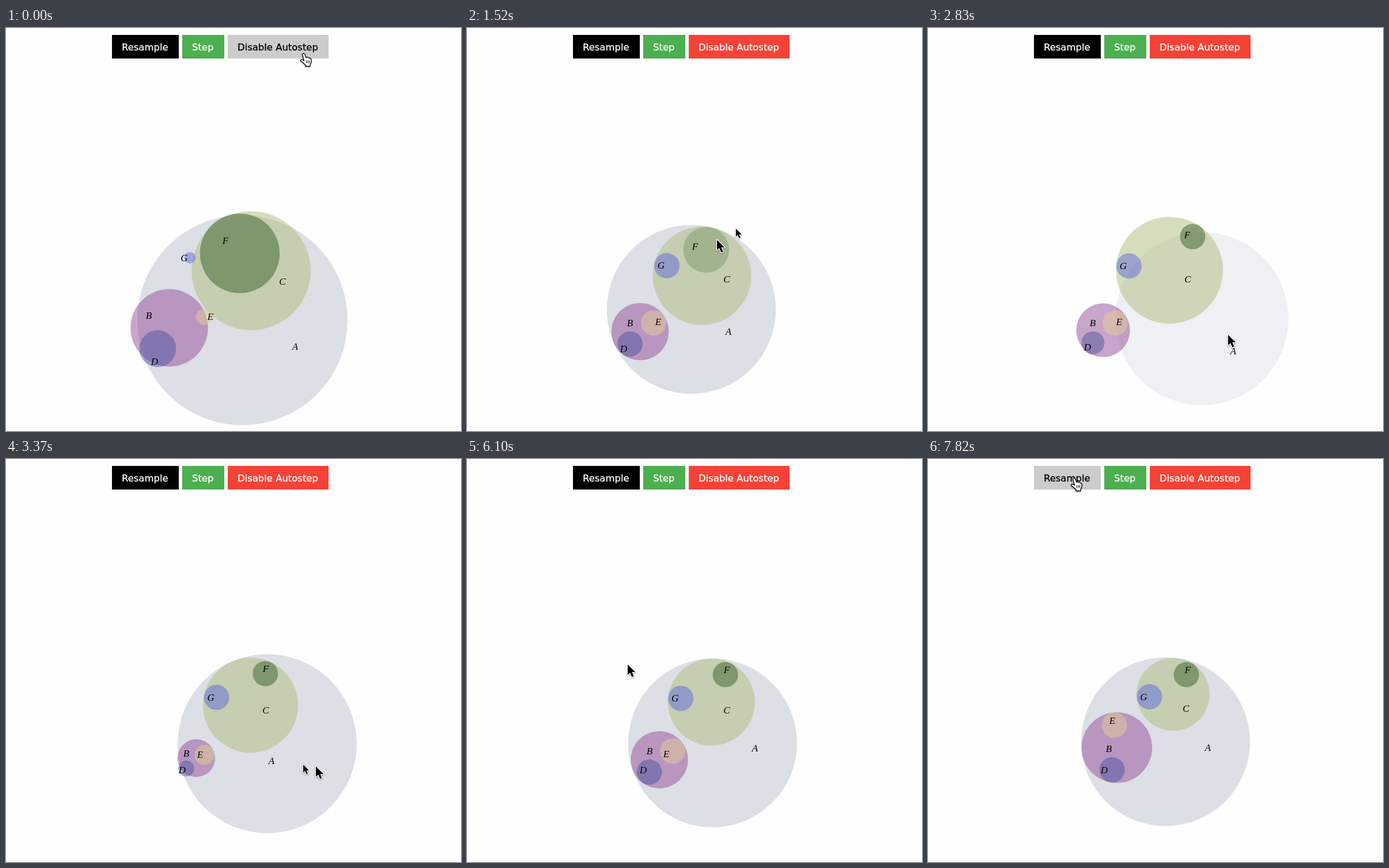
An HTML page for the animation above (8 s loop, 790 px wide and 700 px high).

```html
<!DOCTYPE html>
<html lang="en">
<head>
<meta charset="utf-8">
<title>Euler diagram</title>
<style>
  html, body { margin: 0; width: 100%; height: 100%; overflow: hidden; background: #fefefe; }
  svg { display: block; width: 790px; height: 700px; }
  .btn { font: 16.45px "DejaVu Sans", sans-serif; stroke-width: .3; }
  .label { font: italic 17px "Liberation Serif", serif; text-anchor: middle; }
  #arrow, #echo, #hand { stroke-linejoin: round; filter: drop-shadow(0 1.5px 1px rgba(0,0,0,.4)); }
  #arrow, #echo { fill: #000; stroke: #fff; stroke-width: 2.6; paint-order: stroke; }
  #hand { fill: #fff; stroke: #000; stroke-width: 1.3; }
</style>
</head>
<body>
<svg viewBox="0 0 790 700">
  <g id="buttons"></g>
  <g id="circles"></g>
  <g id="labels"></g>
  <path id="echo" d="M1 1V18L5 14.4 8 21.500 11 20.200 8 13.300H13.600Z"/>
  <path id="arrow" d="M1 1V19L5.200 15.200 8.400 22.700 11.600 21.300 8.400 14H14.200Z"/>
  <g id="hand">
    <path d="M-1.5 3C-1 .5 2 .5 2.8 2.500L5 8.500C6 7 8 7.300 8.500 9 9.500 8 11 8.300 11.500 10 13 9.300 14 10.500 14 12.500V16L12 20.500V23.500H4V21L-4 14.500C-5 12.500-3 11-1 12L1.500 13.800Z"/>
    <path d="M5.500 13.500V18M8 13.500V18M10.500 13.500V18" fill="none" stroke-width="1"/>
  </g>
</svg>
<script>
const LOOP = 8000, STEP = 88.5;
const $ = id => document.getElementById(id);

function set(el, attrs) {
  for (const k in attrs) el.setAttribute(k, attrs[k]);
}

function add(parent, tag, attrs, text = '') {
  const el = document.createElementNS('http://www.w3.org/2000/svg', tag);
  set(el, attrs);
  el.textContent = text;
  $(parent).appendChild(el);
  return el;
}

const clamp = u => Math.max(0, Math.min(1, u));
const settle = u => (1 - Math.exp(-4.5 * u)) / (1 - Math.exp(-4.5));
const mix = (a, b, u) => a.map((v, i) => v + (b[i] - v) * u);

// Every circle but the root touches its parent from inside.
const parent = { B: 'A', C: 'A', D: 'B', E: 'B', F: 'C', G: 'C' };
const colors = {
  A: 'rgb(188,194,206)', B: 'rgb(149,78,154)', C: 'rgb(175,190,124)', D: 'rgb(81,87,159)',
  E: 'rgb(229,205,147)', F: 'rgb(56,99,44)', G: 'rgb(95,106,224)'
};
const names = Object.keys(colors);

// Child on its parent's rim: angle in degrees, radius, overhang.
const rim = (deg, r = 22, gap = 0) => [deg, r, gap];

// A layout is reached between two steps; labels not named stay where they were.
const layouts = [
  { from: 0, to: 0, A: [410.5, 507.5, 182.5],
    B: rim(174, 67.3, 12.6), C: rim(-80, 103.3, 8), D: rim(119, 32, 6),
    E: rim(-17.6, 14, 10), F: rim(-123, 69.2, 2), G: rim(192, 9.7, 15),
    labels: { A: [502, 554], B: [248, 500], C: [480, 441], D: [258, 580], E: [355, 502], F: [381, 370] } },
  { from: 0, to: 9, A: [389.5, 488.7, 146.7],
    B: rim(156.5, 49.7), C: rim(-72.4, 85.5), D: rim(129), E: rim(-33), F: rim(-81, 39.8), G: rim(196),
    labels: { A: [454, 528], B: [283, 513], C: [451, 437], D: [272, 558], E: [332, 511], F: [396, 380] } },
  { from: 20, to: 22, A: [395.5, 473, 150.3],
    B: rim(150.4, 46.6, 1.5), C: rim(-65.5, 92.8), D: rim(129, 20, 1.5), E: rim(-31), F: rim(-55.5), G: rim(186),
    labels: { A: [450, 530], B: [286, 513], D: [277, 555], F: [450, 360] } },
  { from: 36, to: 38, A: [453.5, 494.5, 155.4],
    B: rim(168.5, 32.7, 3), C: rim(-113.4, 82.6), D: rim(134, 13.8, 6), E: rim(-21, 17.2), F: rim(-65), G: rim(193),
    labels: { A: [461, 525], B: [313, 512], D: [306, 541], E: [337, 514], F: [451, 365] } },
  { from: 38, to: 69, A: [426.4, 493.2, 146.6],
    B: rim(162.5, 49.7), C: rim(-91.7, 75.6), D: rim(129), E: rim(-33), F: rim(-63), G: rim(187),
    labels: { A: [500, 503], B: [317, 508], E: [346, 513], F: [451, 367] } },
  { from: 75, to: 79, A: [412.5, 491, 146.6],
    B: rim(173, 61.3), C: rim(-81, 63.3), D: rim(102), E: rim(-96), F: rim(-56), G: rim(174),
    labels: { A: [486, 502], B: [314, 504], C: [448, 434], E: [320, 455] } }
];
layouts.forEach((l, i) => l.labels = { ...(i && layouts[i - 1].labels), ...l.labels });

// Pointer stops: step, x, y.
const stops = [
  [0, 516, 43], [10, 516, 43], [17, 433, 367], [20, 557, 295], [26, 557, 295],
  [30, 440, 500], [34, 600, 564], [38, 537, 533], [42, 428, 519], [60, 428, 519],
  [68, 278, 356], [70, 278, 356], [72, 348, 510], [75, 314, 443], [79, 348, 254], [88, 253, 32]
];
const drags = { F: [17, 20], A: [30, 36], E: [72, 75] };
const echoSteps = [17, 38];

function pointer(s) {
  const i = stops.findIndex(p => p[0] > s);
  if (i < 0) return stops[stops.length - 1].slice(1);
  const a = stops[i - 1], b = stops[i];
  return mix(a, b, (s - a[0]) / (b[0] - a[0])).slice(1);
}

// A dragged circle follows the pointer and springs back in two steps.
function pull(name, s) {
  const [grab, drop] = drags[name] || [Infinity];
  if (!(s >= grab)) return { held: false, dx: 0, dy: 0 };
  const [x0, y0] = pointer(grab), [x, y] = pointer(Math.min(s, drop));
  const left = 1 - clamp((s - drop) / 2);
  return { held: s <= drop, dx: (x - x0) * left, dy: (y - y0) * left };
}

function layoutAt(s) {
  const i = layouts.findLastIndex(l => l.from <= s);
  const b = layouts[i], a = layouts[Math.max(0, i - 1)];
  const u = settle(clamp((s - b.from) / (b.to - b.from || 1)));
  const out = {}, labels = {};
  for (const n of names) {
    const p = mix(a[n], b[n], u), host = out[parent[n]];
    if (host) {
      const [deg, r, gap] = p, d = host.r - r + gap, t = deg * Math.PI / 180;
      out[n] = { x: host.x + d * Math.cos(t), y: host.y + d * Math.sin(t), r };
    } else {
      out[n] = { x: p[0], y: p[1], r: p[2] };
    }
    labels[n] = n === 'G' ? [out.G.x - 10, out.G.y + 1] : mix(a.labels[n], b.labels[n], u);
  }
  return { circles: out, labels };
}

const shapes = {}, tags = {};
for (const n of names) {
  shapes[n] = add('circles', 'circle', { fill: colors[n] });
  tags[n] = add('labels', 'text', { class: 'label' }, n);
}

const buttons = [
  ['Resample', 184, 116, '#000'],
  ['Step', 306, 73, '#4caf50'],
  ['Disable Autostep', 385, 175, '#f44336']
].map(([text, x, w, color]) => ({
  x, w, color,
  box: add('buttons', 'rect', { x, y: 12, width: w, height: 41 }),
  text: add('buttons', 'text', { x: x + 17, y: 39, class: 'btn' }, text)
}));

const place = (id, [x, y], show, scale = 1) => set($(id), {
  transform: `translate(${x} ${y}) scale(${scale})`,
  visibility: show ? 'visible' : 'hidden'
});

function draw(time) {
  const s = Math.floor(time % LOOP / STEP + 0.1);

  const { circles, labels } = layoutAt(s);
  for (const n of names) {
    const { x, y, r } = circles[n], { held, dx, dy } = pull(n, s);
    set(shapes[n], { cx: x + dx, cy: y + dy, r, 'fill-opacity': held ? 0.25 : 0.5 });
    set(tags[n], { x: labels[n][0] + dx, y: labels[n][1] + dy + 4.5 });
  }

  const at = pointer(s);
  let hover = false;
  for (const b of buttons) {
    const on = at[1] > 12 && at[1] < 53 && at[0] > b.x && at[0] < b.x + b.w;
    const ink = on ? '#000' : '#fff';
    hover = hover || on;
    set(b.box, { fill: on ? '#ccc' : b.color });
    set(b.text, { fill: ink, stroke: ink });
  }
  place('hand', at, hover);
  place('arrow', at, !hover);
  place('echo', pointer(s + 0.8), echoSteps.includes(s), 0.8);
}

const start = performance.now();
function tick() {
  draw(performance.now() - start);
  requestAnimationFrame(tick);
}
tick();
</script>
</body>
</html>
```
